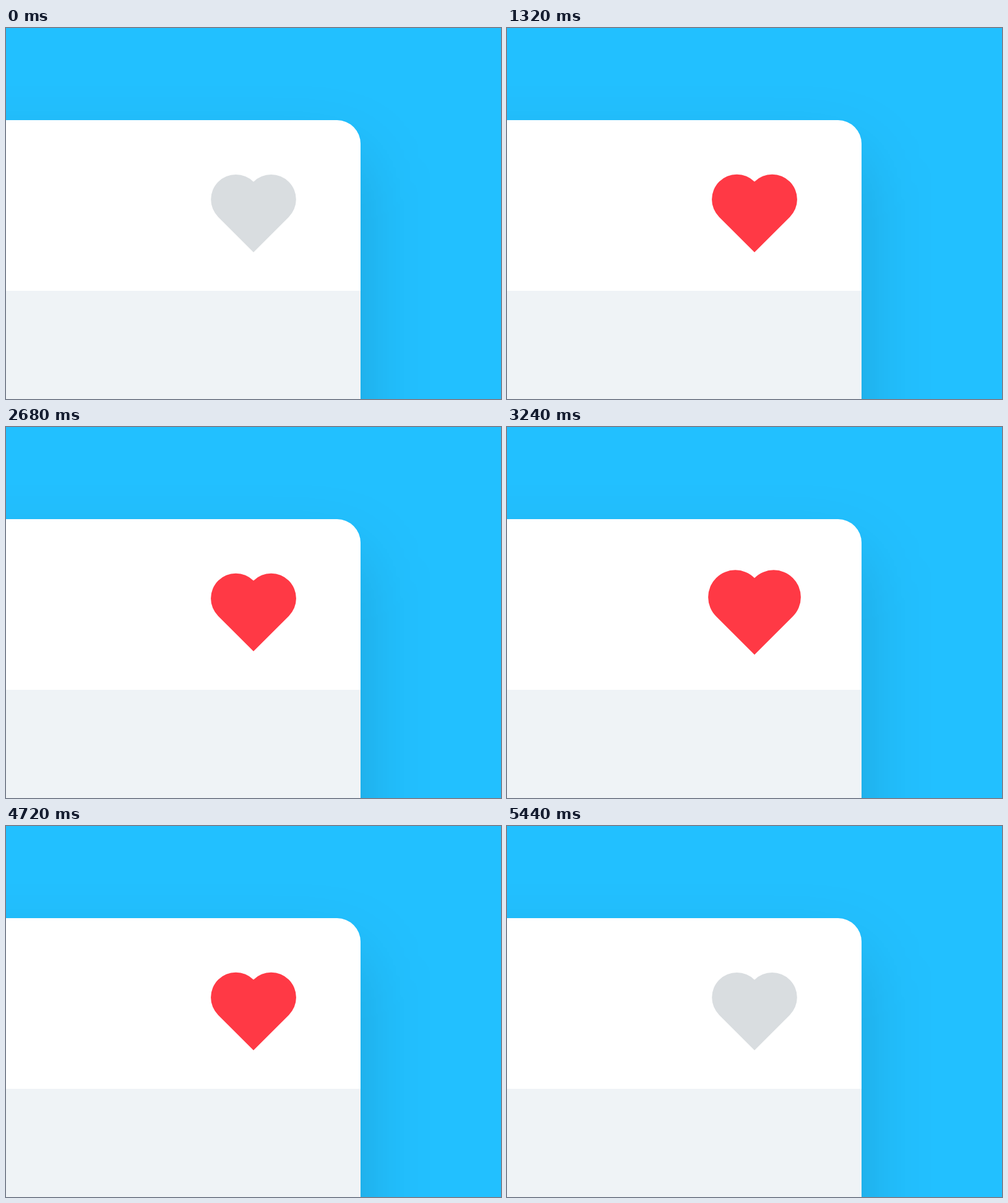
Recreate the animation shown at these times as an HTML page. Size 800 by 600 pixels, loop 6560 ms.

```html
<!DOCTYPE html>
<html lang="en">
<head>
<meta charset="utf-8">
<title>Like button</title>
<style>
  html, body { margin: 0; width: 100%; height: 100%; overflow: hidden; background: #22c0ff; }
  svg { display: block; width: 100vw; height: 100vh; }
</style>
</head>
<body>
<svg viewBox="0 0 800 600">
  <defs>
    <filter id="soft" filterUnits="userSpaceOnUse" x="-700" y="-100" width="1700" height="1700">
      <feGaussianBlur stdDeviation="56"/>
    </filter>
  </defs>
  <rect width="800" height="600" fill="#22c0ff"/>
  <rect x="-400" y="205" width="973" height="1000" rx="38" fill-opacity=".15" filter="url(#soft)"/>
  <rect x="-400" y="149" width="973" height="1000" rx="38" fill="#fff"/>
  <rect y="425" width="573" height="175" fill="#eff3f6"/>
  <path id="heart" d="M0 62.7L-57 5.7A40.3 40.3 0 0 1 0 -51.3A40.3 40.3 0 0 1 57 5.7Z"/>
  <circle id="ring" cx="400" cy="300" fill="none" stroke="#000"/>
</svg>
<script>
  const LOOP = 6560, CYCLE = 680, LEAD = 40, STEP = 40, CYCLES = 8;
  const GRAY = [217, 221, 224], RED = [255, 57, 69];
  const heart = document.getElementById('heart');
  const ring = document.getElementById('ring');

  const clamp = v => Math.min(1, Math.max(0, v));
  const inOut = (v, p) => v < .5 ? Math.pow(2 * v, p) / 2 : 1 - Math.pow(2 - 2 * v, p) / 2;
  const mix = (a, b, k) => `rgb(${a.map((c, i) => Math.round(c + (b[i] - c) * k))})`;

  const PEAK = .64;
  const beat = x => inOut(x < PEAK ? x / PEAK : (1 - x) / (1 - PEAK), 3);

  function drawRing(x) {
    const outer = 255.5 * inOut(x, 2);
    const inner = Math.min(outer, 255.5 * inOut(clamp((x - .342) / .623), 2));
    ring.setAttribute('r', (outer + inner) / 2);
    ring.setAttribute('stroke-width', outer - inner);
    ring.setAttribute('stroke-opacity', .18 * (1 - x));
  }

  function draw(time) {
    const t = Math.floor((time % LOOP) / STEP) * STEP;
    const cycle = Math.floor(t / CYCLE);
    const x = clamp((t % CYCLE - LEAD) / (CYCLE - LEAD));
    const tapped = cycle === 0 || cycle === CYCLES - 1;
    const resting = cycle >= CYCLES;

    let scale = 1, red = 1;
    if (resting) red = 0;
    else if (tapped) {
      scale += .14 * Math.sin(Math.PI * x);
      const k = clamp(x / .75);
      red = cycle === 0 ? k : 1 - k;
    } else scale += .1 * beat(x);

    heart.setAttribute('transform', `translate(400 300) scale(${scale})`);
    heart.setAttribute('fill', mix(GRAY, RED, red));
    drawRing(tapped ? x : 0);
  }

  const start = performance.now();
  function tick() {
    draw(performance.now() - start);
    requestAnimationFrame(tick);
  }
  tick();
</script>
</body>
</html>
```
